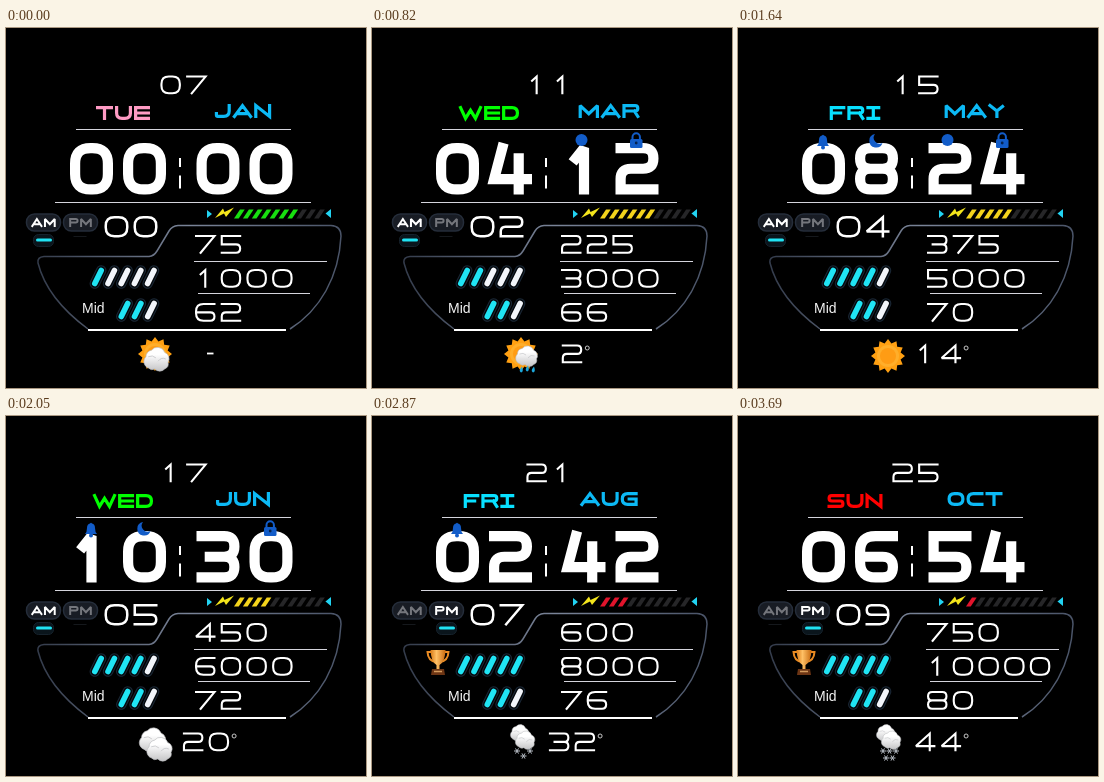
Recreate the animation shown at these times as an HTML page. Size 360 px wide and 360 px high, loop 4100 ms.

```html
<!DOCTYPE html>
<html lang="en">
<head>
<meta charset="utf-8">
<title>Watch face</title>
<style>
  html, body { margin: 0; width: 100%; height: 100%; overflow: hidden; background: #000; }
  svg { display: block; width: 100vw; height: 100vh; }
</style>
</head>
<body>
<svg viewBox="0 0 360 360" role="img">
  <defs>
    <linearGradient id="cloudFill" x1="0" y1="0" x2="0" y2="1">
      <stop offset=".3" stop-color="#fff"/><stop offset="1" stop-color="#c4c4c6"/>
    </linearGradient>
    <linearGradient id="gold">
      <stop offset="0" stop-color="#d87a16"/><stop offset=".4" stop-color="#ffc065"/><stop offset="1" stop-color="#c86a10"/>
    </linearGradient>
    <linearGradient id="rim" x1="0" y1="0" x2="1" y2="0">
      <stop offset="0" stop-color="#343c4c"/><stop offset=".5" stop-color="#7a8498"/><stop offset="1" stop-color="#4a5468"/>
    </linearGradient>
  </defs>
  <rect width="360" height="360"/>
  <path d="M82 301C55 281 38 259 32 235Q31 229 38 228.500H143Q148 228 151 223L163 203Q166 198 172 197.500H325Q335 198 335 208C333 249 314 282 284 301"
        fill="none" stroke="url(#rim)" stroke-width="1.500"/>
  <path d="M70 101.500H285M49 174.500H305M188 233.500H321M192 265.500H304" stroke="#d4d4dc" stroke-width="1.200"/>
  <path d="M82 302H280" stroke="#fff" stroke-width="2"/>
  <path d="M174 130V139M174 147.500V160.500" stroke="#fff" stroke-width="2"/>
  <path d="M201 182L206 186L201 190ZM325 181V190L319.500 185.500Z" fill="#22d3f2"/>
  <path d="M209 190L217 180.500L218.500 184L228 179.500L220 189L218 185.500Z" fill="#f4e51c"/>
  <text x="76" y="284.500" font-family="'Liberation Sans', Arial, sans-serif" font-size="14" fill="#f4f4f4">Mid</text>
  <g id="live"></g>
</svg>
<script>
const STEP = 410, COUNT = 10;
const MONTHS = 'JAN FEB MAR APR MAY JUN JUL AUG SEP OCT'.split(' ');
const DAYS = 'SUN MON TUE WED THU FRI SAT'.split(' ');
const DAY_COLORS = ['#f00', '#ffe600', '#ff9bc4', '#0f0', '#ff8a00', '#08e0ff', '#a050ff'];
const BLUE = '#125cc8', CYAN = '#20e4f4';

// Strokes over a 5x5 lattice lettered a-y; lowercase corners are rounded, * closes.
const GLYPHS = {
  0: 'aeyu*', 1: 'GCW', 2: 'AeokUY', 3: 'AeoL LoyU', 4: 'XDPT', 5: 'EAKoyU',
  6: 'EauyoK', 7: 'AEV', 8: 'aeok* koyu*', 9: 'OkaeyU', '-': 'KO',
  A: 'UCY QS', B: 'AeoK* KoyU*', C: 'EauY', D: 'AeyU*', E: 'EAUY KO', F: 'UAE KN',
  G: 'EauYOM', H: 'AU EY KO', I: 'AE CW UY', J: 'EyuP', L: 'AUY', M: 'UAREY',
  N: 'UAYE', O: 'aeyu*', P: 'UAeoK', R: 'UAeoK NY', S: 'EakoyU', T: 'AE CW',
  U: 'AuyE', W: 'AVHXE', Y: 'AMEMW'
};
const OPEN_FOUR = { 4: 'BPT IX' };
const WIDTHS = { A: 1.14, M: 1.2, W: 1.36, I: .82, J: .94, L: .82, E: .94, F: .92, P: .96, '-': .35 };

const toward = (a, b, d) => {
  const k = d / Math.hypot(b.x - a.x, b.y - a.y);
  return `${(a.x + (b.x - a.x) * k).toFixed(2)} ${(a.y + (b.y - a.y) * k).toFixed(2)}`;
};
const dist = (a, b) => Math.hypot(a.x - b.x, a.y - b.y);

function strokePath(code, x, y, w, h, sw) {
  const closed = code.endsWith('*');
  const pts = [...code.replace('*', '')].map(c => {
    const i = c.toLowerCase().charCodeAt(0) - 97;
    return { x: x + sw / 2 + i % 5 / 4 * (w - sw), y: y + sw / 2 + (i / 5 | 0) / 4 * (h - sw), soft: c > 'Z' };
  });
  const n = pts.length, radius = w * .36;
  const d = pts.map((p, i) => {
    const prev = pts[i - 1] || (closed && pts[n - 1]), next = pts[i + 1] || (closed && pts[0]);
    if (!p.soft || !prev || !next) return `L${p.x} ${p.y}`;
    const cut = Math.min(radius, dist(p, prev) / 2, dist(p, next) / 2);
    return `L${toward(p, prev, cut)}Q${p.x} ${p.y} ${toward(p, next, cut)}`;
  }).join('');
  return 'M' + d.slice(1) + (closed ? 'Z' : '');
}

const glyphWidth = (ch, w) => w * (WIDTHS[ch] || 1);
const runWidth = (s, f) => [...s].reduce((sum, ch) => sum + glyphWidth(ch, f.w) + f.gap, -f.gap);

function lettering(s, x, y, f, color = '#fff') {
  const glyphs = { ...GLYPHS, ...f.shapes };
  let d = '';
  for (const ch of s) {
    const w = glyphWidth(ch, f.w);
    for (const code of glyphs[ch].split(' ')) d += strokePath(code, x, y, w, f.h, f.sw);
    x += w + f.gap;
  }
  return `<path d="${d}" fill="none" stroke="${color}" stroke-width="${f.sw}" stroke-linecap="square" stroke-miterlimit="2.5"/>`;
}
const centred = (s, cx, y, f, color) => lettering(s, cx - runWidth(s, f) / 2, y, f, color);

const BIG = { w: 43, h: 51.5, gap: 10, sw: 10.2, shapes: OPEN_FOUR };
const SECONDS = { w: 24, h: 21.5, gap: 5, sw: 2.5 };
const SMALL = { w: 20.5, h: 18.8, gap: 5.2, sw: 2.1 };
const WORD = { w: 17, h: 14, gap: 2, sw: 3.2 };
const TAG = { w: 9.8, h: 9, gap: 1.5, sw: 2 };

const circle = (x, y, r, fill, extra = '') => `<circle cx="${x}" cy="${y}" r="${r}" fill="${fill}" ${extra}/>`;
const path = (d, fill, extra = '') => `<path d="${d}" fill="${fill}" ${extra}/>`;
const range = (n, fn) => Array.from({ length: n }, (_, i) => fn(i)).join('');

function pills(x, y, total, on) {
  return range(total, i => {
    const d = `M${x + i * 13.2 - 3.2} ${y + 6.5}l6.400 -13`;
    const line = (color, width) => path(d, 'none', `stroke="${color}" stroke-width="${width}" stroke-linecap="round"`);
    return line('#1a2735', 10.5) + line('#04080c', 8.4) + line(i < on ? CYAN : '#f2f5fa', 5.6);
  });
}

function battery(level) {
  const on = Math.ceil(level / 10);
  const color = level > 60 ? '#18e010' : level > 30 ? '#f4d41c' : '#e2142c';
  return range(10, i => path(`M${228 + i * 8.9} 190.500l6 -9h4.700l-6 9z`, i < on ? color : '#262628'));
}

function halfDay(label, x, active) {
  return `<rect x="${x - 17}" y="186" width="34" height="17" rx="8" fill="#181c24" stroke="#252d3a" stroke-width="1.500"/>`
    + centred(label, x, 190, TAG, active ? '#fff' : '#74767c')
    + (active
      ? `<rect x="${x - 10}" y="206.500" width="20" height="12" rx="5" fill="#0a151c" stroke="#16222c"/><rect x="${x - 7.5}" y="210.500" width="16" height="3" rx="1.500" fill="${CYAN}"/>`
      : path(`M${x - 7} 208.500h13`, 'none', 'stroke="#15181c"'));
}

const ICONS = [
  circle(209.5, 112, 6, BLUE),
  `<rect x="258" y="111" width="12.500" height="9" rx="1.500" fill="${BLUE}"/>`
    + path('M260.500 112V109a3.700 3.700 0 0 1 7.400 0V112', 'none', `stroke="${BLUE}" stroke-width="2"`)
    + circle(264.2, 115, 1.4, '#06234f'),
  path('M137 106A6.800 6.800 0 1 0 144.500 115A6 6 0 0 1 137 106Z', BLUE),
  path('M79 118Q81 116 81 112Q81 108 84 107.500Q85 106 86 107.500Q89 108 89 112Q89 116 91 118Z', BLUE)
    + circle(85, 119.5, 2, BLUE)
];
// Icons switch on one by one, then off in the same order.
const statusIcons = k => ICONS.map((icon, i) => k > i && k < i + 5 ? icon : '').join('');

const trophy = path('M59 236H55.500Q56 245 64 246M73 236H76.500Q76 245 68 246', 'none', 'stroke="#e98a22" stroke-width="2"')
  + path('M58.500 234H73.500Q73 246 67.500 249V253H64.500V249Q59 246 58.500 234Z', 'url(#gold)')
  + path('M60 253H72L73 259H59Z', '#6d3514') + path('M62 255.500H70', 'none', 'stroke="#d39a5c" stroke-width="1.500"');

function sun(x, y) {
  const star = range(24, i => {
    const a = i * Math.PI / 12, r = i % 2 ? 13 : 17;
    return `${i ? 'L' : 'M'}${(x + r * Math.sin(a)).toFixed(1)} ${(y - r * Math.cos(a)).toFixed(1)}`;
  });
  return path(star + 'Z', '#ffa012') + circle(x, y, 11, '#ffae2a') + circle(x, y, 8, '#ff9c14');
}

const cloud = (x, y, s) => `<g transform="translate(${x} ${y}) scale(${s})" stroke="#b9babd" stroke-width=".6">`
  + path('M-8 8A6 6 0 0 1 -10 -2A6 6 0 0 1 -5 -8A7 7 0 0 1 7 -6A6 6 0 0 1 10 3A5 5 0 0 1 7 9A6 6 0 0 1 -2 9A5 5 0 0 1 -8 8Z', 'url(#cloudFill)')
  + path('M-8 -2Q-4 -4 -1 -1M1 2Q4 -2 8 0', 'none') + '</g>';

const drop = (x, y) => path(`M${x + 1} ${y - 3.5}Q${x + 3} ${y + 2} ${x} ${y + 2.5}Q${x - 3} ${y + 1} ${x + 1} ${y - 3.5}Z`, '#1ca8dc');
const flake = (x, y) => path(`M${x - 3} ${y}h6M${x - 1.5} ${y - 2.6}l3 5.200M${x + 1.5} ${y - 2.6}l-3 5.200`, 'none', 'stroke="#b8bec6" stroke-width="1"');
// Rows of precipitation: three above, the rest staggered below.
const fall = (shape, n) => range(n, i => {
  const row = i / 3 | 0;
  return shape(145 + i % 3 * 6.5 + row * 3, 335 + row * 7 + (n === 3 && i === 1 ? 5 : 0));
});

const brightSun = sun(149, 326);
const sunnyCloud = brightSun + cloud(155, 328, .95);
const highCloud = cloud(148, 317, .8) + cloud(153.5, 324, .85);
const WEATHER = [
  brightSun + cloud(151, 331, 1.1),
  sunnyCloud + drop(149, 342) + drop(155, 341) + drop(161, 342),
  sunnyCloud + flake(150, 342) + flake(158, 342),
  sun(150, 328),
  cloud(147, 324, 1.15) + cloud(154, 333, 1.1),
  highCloud + fall(drop, 3),
  highCloud + fall(flake, 3),
  highCloud + fall(drop, 5),
  highCloud + fall(flake, 5)
];

function temperature(k) {
  if (!k) return path('M201 325.500H207.500', 'none', 'stroke="#fff" stroke-width="1.800"');
  const s = String(6 * k - 10), w = runWidth(s, SMALL), x = 204 - (w + 8) / 2;
  return lettering(s, x, 316.5, SMALL)
    + circle(x + w + 5, 320, 2, 'none', 'stroke="#ddd" stroke-width=".9"');
}

const two = n => String(n).padStart(2, '0');

function scene(k) {
  const date = 7 + 2 * k, steps = 1000 * (k + 1);
  const day = new Date(2020, k, date).getDay();
  return centred(two(date), 177.5, 47.5, SMALL)
    + centred(DAYS[day], 117, 78, WORD, DAY_COLORS[day])
    + centred(MONTHS[k], 237, 76, WORD, '#0cb9f5')
    + lettering(two(2 * k % 12), 64, 115, BIG)
    + lettering(two(6 * k), 190.5, 115, BIG)
    + lettering(two(k), 98.5, 188, SECONDS)
    + statusIcons(k)
    + halfDay('AM', 37.5, k < 6) + halfDay('PM', 74.5, k > 5)
    + battery(70 - 7 * k)
    + lettering(String(75 * (k + 1)), 189, 207, SMALL)
    + lettering(String(steps), 189, 241, SMALL)
    + lettering(String(62 + 2 * k), 189, 275, SMALL)
    + pills(92, 249, 5, Math.ceil(steps / 8000 * 5)) + pills(118.5, 282, 3, 2)
    + (steps >= 8000 ? trophy : '')
    + WEATHER[Math.max(0, k - 1)] + temperature(k);
}

const live = document.getElementById('live');
const start = performance.now();
let shown = -1;
function draw(now) {
  const k = Math.floor(Math.max(0, now - start) / STEP) % COUNT;
  if (k !== shown) live.innerHTML = scene(shown = k);
  requestAnimationFrame(draw);
}
draw(start);
</script>
</body>
</html>
```
